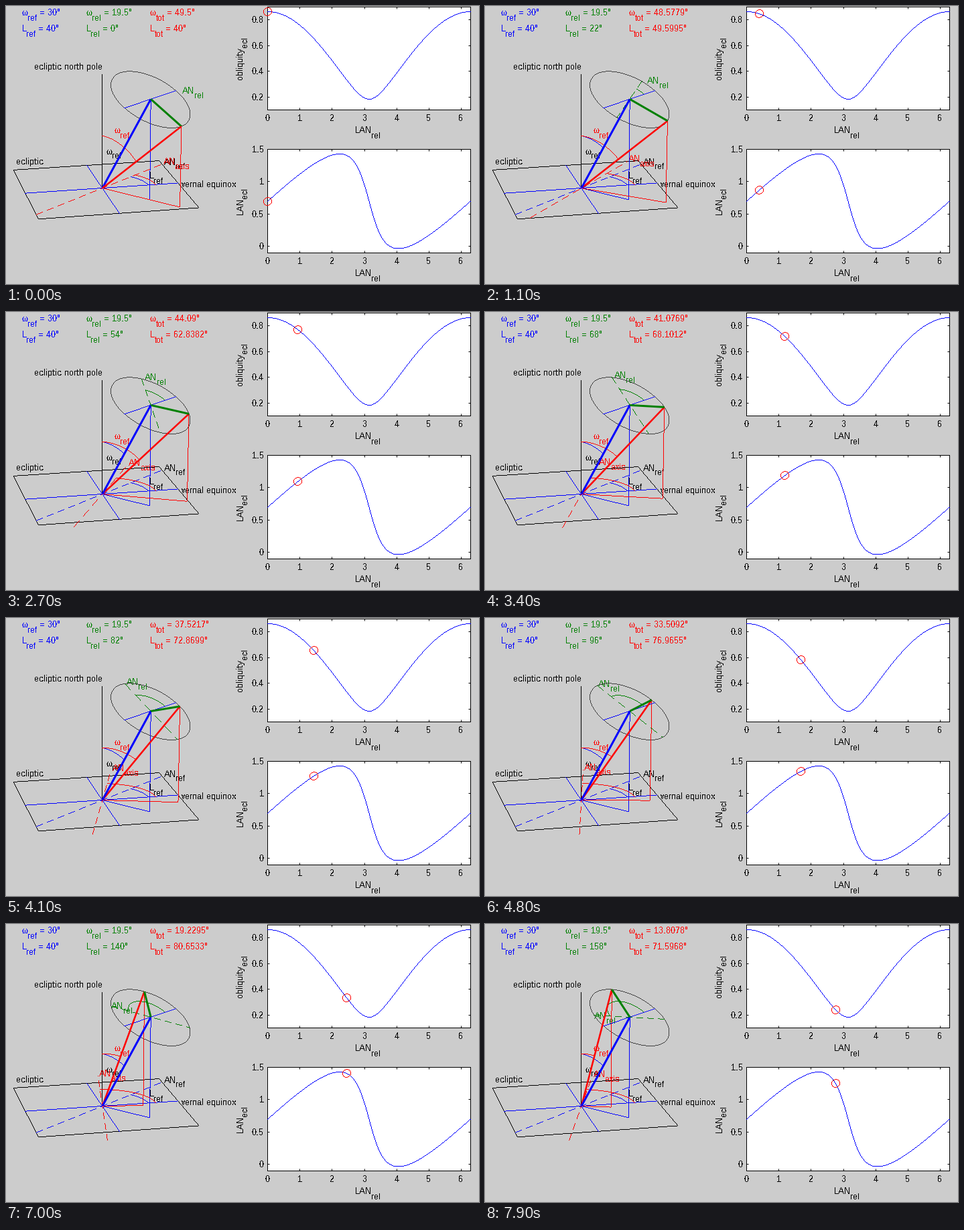
Animation of 706 by 416 pixels, one loop 8000 ms. Source, as a matplotlib script:

```python
import numpy as np
import matplotlib.pyplot as plt
from matplotlib.animation import FuncAnimation

W, H, DPI = 706, 416, 64
PX = 72 / DPI                      # points per pixel
FRAMES, STEP = 80, 2               # degrees per frame
BLUE, RED, GREEN, BLACK = "#0000ff", "#ff0000", "#008000", "#000000"

plt.rcParams.update({
    "font.family": "Liberation Sans",
    "font.size": 13 * PX,
    "text.antialiased": False,
    "text.hinting": "native",
    "text.hinting_factor": 1,
    "lines.linewidth": PX,
    "lines.solid_capstyle": "butt",
    "axes.linewidth": PX,
    "path.simplify": False,
})

# Orbit geometry
REF, REL, NODE = np.radians([30, 19.5, 40])
LENGTH = 1.5
RING = LENGTH * np.tan(REL)


def total_tilt(a):
    return np.arccos(np.cos(REF) * np.cos(REL)
                     - np.sin(REF) * np.sin(REL) * np.cos(a))


def total_node(a):
    return NODE + np.arctan2(
        np.sin(REL) * np.sin(a),
        np.sin(REF) * np.cos(REL) + np.cos(REF) * np.sin(REL) * np.cos(a))


def pole(r, tilt, node):
    """Points at distance r, tilted from north about the given node."""
    return r * np.array([np.sin(tilt) * np.sin(node),
                         -np.sin(tilt) * np.cos(node),
                         np.cos(tilt) + 0 * node])


def flat(r, angle):
    return np.array([r * np.cos(angle), r * np.sin(angle), 0 * angle])


CENTRE = pole(LENGTH, REF, NODE)
DOWN = pole(1, REF + np.pi / 2, NODE)
ACROSS = flat(1, NODE)


def on_ring(r, angle):
    """Points of the tilted disc, measured from its node line."""
    return (CENTRE[:, None] + r * (np.outer(ACROSS, np.cos(angle))
                                   - np.outer(DOWN, np.sin(angle))))


# Perspective camera
AZ, EL = np.radians([12, 18.3])
SCALE, SHRINK = 116.6, 0.055
OX, OY = 143.4, 272


def depth(p):
    away = p[0] * np.sin(AZ) + p[1] * np.cos(AZ)
    return away * np.cos(EL) - p[2] * np.sin(EL)


def project(p):
    p = np.asarray(p, float)
    right = p[0] * np.cos(AZ) - p[1] * np.sin(AZ)
    away = p[0] * np.sin(AZ) + p[1] * np.cos(AZ)
    up = away * np.sin(EL) + p[2] * np.cos(EL)
    s = SCALE / (1 + SHRINK * depth(p))
    return np.array([OX + right * s, OY - up * s])


def path(*points):
    return np.array(points, float).T


fig = plt.figure(figsize=(W / DPI, H / DPI), dpi=DPI, facecolor="0.8")
stage = fig.add_axes([0, 0, 1, 1], zorder=2)
stage.set(xlim=(-0.5, W - 0.5), ylim=(H - 0.5, -0.5))
stage.axis("off")


def trace(xy, dashed=False):
    """Hard-edged line: one pixel-long stroke per step of the path."""
    steps = np.abs(np.diff(xy)).max(axis=0)
    along = np.concatenate([[0], np.cumsum(steps)])
    t = np.arange(0, along[-1] + 0.5)
    if dashed:
        t = t[t % 16 < 10]
    x, y = (np.round(np.interp(t, along, v)) for v in xy)
    gap = np.full_like(x, np.nan)
    return (np.column_stack([x - 0.5, x + 0.5, gap]).ravel(),
            np.column_stack([y, y, gap]).ravel())


def pen(color, dashed=False, z=2):
    """Returns a function that draws a thin line through pixel positions."""
    art, = stage.plot([], [], color=color, zorder=z, snap=False,
                      clip_on=False)
    return lambda xy: art.set_data(*trace(xy, dashed))


def thick(color, width, z):
    return stage.plot([], [], color=color, lw=width * PX, zorder=z)[0]


def label(x, y, main, sub="", tail="", color=BLACK, upright=False):
    """Text with an optional subscript and tail; returns head and end."""
    turn = dict(rotation=90, ha="right") if upright else dict(ha="left")
    head = end = stage.text(x, y, main, color=color, zorder=1,
                            va="bottom" if upright else "baseline", **turn)
    corner = (1, 1) if upright else (1, 0)
    for text, size, drop in ((sub, 12, 6), (tail, 13, -6)):
        if text:
            shift = (drop * PX, 0) if upright else (0, -drop * PX)
            end = stage.annotate(text, corner, xycoords=end, xytext=shift,
                                 textcoords="offset points", color=color,
                                 fontsize=size * PX, va="bottom", zorder=1,
                                 annotation_clip=False, **turn)
    return head, end


# Readouts
for x, name, color, tilt, node in ((23, "ref", BLUE, "30", "40"),
                                   (119, "rel", GREEN, "19.5", "0"),
                                   (214, "tot", RED, "49.5", "40")):
    tilt_text = label(x, 14, "ω", name, f" = {tilt}°", color)[1]
    node_text = label(x, 38, "L", name, f" = {node}°", color)[1]
    if name == "rel":
        rel_node = node_text
tot_tilt, tot_node = tilt_text, node_text

# Fixed part of the scene
label(41, 95, "ecliptic north pole")
label(15, 237, "ecliptic")
label(261, 270, "vernal equinox")
label(149, 221, "ω", "ref")
label(213, 258, "L", "ref")
label(235, 237, "AN", "ref")
label(161, 190, "ω", "ref", color=RED)

turn = np.linspace(0, 1, 61)
foot = CENTRE * [1, 1, 0]
for color, points in (
        (BLACK, path((1, 1, 0), (1, -1, 0), (-1, -1, 0), (-1, 1, 0),
                     (1, 1, 0))),
        (BLACK, path((0, 0, 0), (0, 0, 1.5))),
        (BLUE, path((-1, 0, 0), (1, 0, 0))),
        (BLUE, path((0, -1, 0), (0, 1, 0))),
        (BLUE, path((0, 0, 0), foot, CENTRE)),
        (BLUE, flat(0.6, NODE * turn)),
        (BLUE, pole(0.7, REF * turn, NODE)),
        ("0.25", on_ring(RING, 2 * np.pi * turn))):
    pen(color)(project(points))
pen(BLUE, dashed=True)(project(path(flat(-1.3, NODE), flat(1.3, NODE))))
thick(BLUE, 3, z=4).set_data(*project(path((0, 0, 0), CENTRE)))

# Moving part of the scene
node_line = pen(RED, dashed=True)
drop_line = pen(RED)
node_arc = pen(RED)
tilt_arc = pen(RED)
rel_line = pen(GREEN, dashed=True)
rel_arc = pen(GREEN)
pen(BLUE)(project(on_ring(RING, np.array([0, np.pi]))))
axis_line = thick(RED, 2.5, z=3)
spoke = thick(GREEN, 3, z=4)
axis_label = label(0, 0, "AN", "axis", color=RED)[0]
rel_label = label(0, 0, "AN", "rel", color=GREEN)[0]


def panel(top, bottom, func, ylim, ticks, name, name_y):
    """Draws one graph; returns a function that moves its marker."""
    left, right = 390, 693
    ax = fig.add_axes([left / W, 1 - bottom / H,
                       (right - left) / W, (bottom - top) / H])
    ax.set(xlim=(0, 2 * np.pi), ylim=ylim)
    ax.set_xticks(range(7))
    ax.set_yticks(ticks, [f"{t:g}" for t in ticks])
    ax.tick_params(direction="in", length=3 * PX, width=PX,
                   top=True, right=True)
    ax.tick_params(axis="x", pad=7 * PX)
    ax.tick_params(axis="y", pad=5 * PX)
    label(520, bottom + 35, "LAN", "rel")
    label(356, name_y, name, "ecl", upright=True)

    def spot(a):
        height = (func(a) - ylim[0]) / (ylim[1] - ylim[0])
        return np.array([left + a / (2 * np.pi) * (right - left),
                         bottom - height * (bottom - top)])

    pen(BLUE)(spot(np.linspace(0, 2 * np.pi, 200)))
    marker = pen(RED, z=5)
    circle = 6 * np.array([np.cos(2 * np.pi * turn),
                           np.sin(2 * np.pi * turn)])
    return lambda a: marker(np.round(spot(a))[:, None] + circle)


move_tilt = panel(1, 155, total_tilt, (0.1, 0.9), [0.2, 0.4, 0.6, 0.8],
                  "obliquity", 109)
move_node = panel(214, 369, total_node, (-0.1, 1.5), [0, 0.5, 1, 1.5],
                  "LAN", 312)


def update(i):
    degrees = STEP * i
    a = np.radians(degrees)
    tilt, node = total_tilt(a), total_node(a)
    tip = pole(LENGTH / np.cos(REL), tilt, node)

    rel_node.set_text(f" = {degrees}°")
    tot_tilt.set_text(f" = {np.degrees(tilt):.6g}°")
    tot_node.set_text(f" = {np.degrees(node):.6g}°")

    for draw, points in (
            (node_line, path(flat(-1.3, node), flat(1.3, node))),
            (drop_line, path((0, 0, 0), tip * [1, 1, 0], tip)),
            (node_arc, flat(0.7, node * turn)),
            (tilt_arc, pole(0.7, tilt * turn, node)),
            (rel_line, on_ring(RING, np.array([a, a + np.pi]))),
            (rel_arc, on_ring(0.3, a * turn)),
            (axis_line.set_data, path((0, 0, 0), tip)),
            (spoke.set_data, path(CENTRE, tip))):
        xy = project(points)
        if draw in (axis_line.set_data, spoke.set_data):
            draw(*xy)
        else:
            draw(xy)
    nearer = depth(tip) * np.cos(REL) < depth(CENTRE)
    axis_line.set_zorder(5 if nearer else 3)

    x, y = project(flat(1.3, node))
    axis_label.set_position((x + 2, y + 0.5))
    x, y = project(on_ring(1.1 * RING, np.array([a])))
    rel_label.set_position((x[0] + 6, y[0] + 5.5))

    move_tilt(a)
    move_node(a)


anim = FuncAnimation(fig, update, frames=FRAMES, interval=100,
                     repeat=True, blit=False)
plt.show()
```
